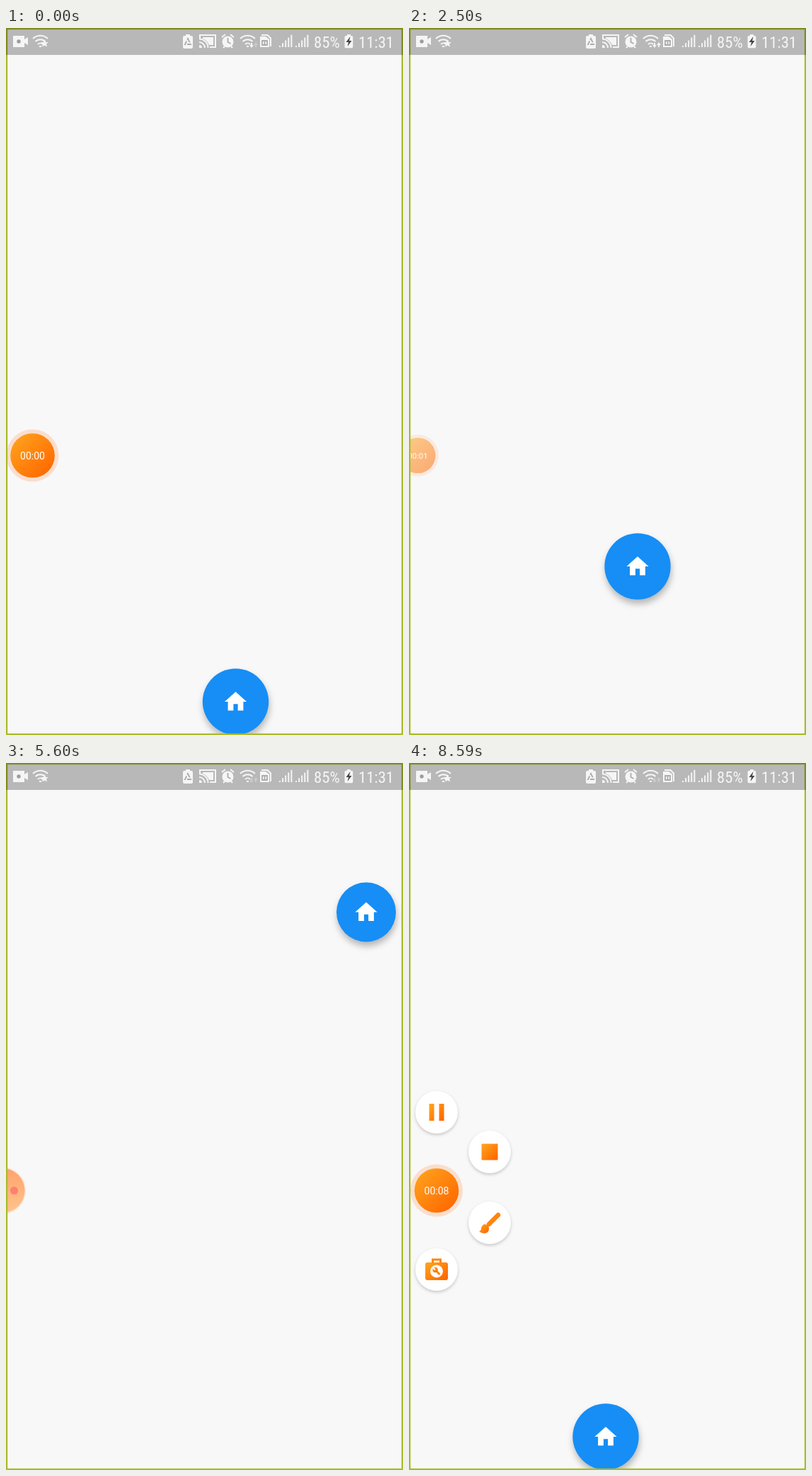
These frames come from a looping animation (561x998 px, 9.1 s). An HTML page:

```html
<!DOCTYPE html>
<html lang="en">
<head>
<meta charset="utf-8">
<title>Floating button</title>
<style>
html, body { margin: 0; width: 100%; height: 100%; overflow: hidden; background: #f8f8f8; }
svg { display: block; width: 561px; height: 998px; }
text { font-family: "Roboto Condensed", Roboto, sans-serif; text-anchor: middle; fill: #fff; }
#time { font: 14px Roboto, sans-serif; }
#fab { filter: drop-shadow(1px 6px 5px rgba(0,0,0,.27)); }
.item { filter: drop-shadow(0 2px 2px rgba(0,0,0,.2)); }
.line { fill: none; stroke: #fff; stroke-width: 2; }
.dark { fill: none; stroke: #aaa; stroke-width: 1.8; }
</style>
</head>
<body>
<svg viewBox="0 0 561 998">
  <defs>
    <linearGradient id="orange" x2="1" y2="1">
      <stop offset=".1" stop-color="#ffa01c"/><stop offset=".9" stop-color="#ff6800"/>
    </linearGradient>
    <linearGradient id="pale" x2="0" y2="1">
      <stop stop-color="#ffa36d"/><stop offset="1" stop-color="#ffc48b"/>
    </linearGradient>
    <path id="wifi" class="line" d="M0 6a15 15 0 0 1 21 0M3.5 10a10 10 0 0 1 14 0M7 14a5 5 0 0 1 7 0M9 17h3"/>
    <path id="signal" class="line"/>
    <path id="cell" d="M0 4q0-2 2-2h2v-2h6v2h2q2 0 2 2v14q0 2-2 2h-10q-2 0-2-2z"/>
    <path id="arrow" d="M-1 0h2v3h2l-3 4-3-4h2z"/>
  </defs>
  <rect width="561" height="998" fill="#f8f8f8"/>

  <g id="fab">
    <circle id="disc" r="46.7" fill="#168ef5"/>
    <path fill="#fff" d="M0-14l15.600 14h-4.700v12.500h-7.800v-9.300h-6.200v9.300h-7.800v-12.500h-4.700z"/>
  </g>

  <g id="menu" fill="url(#orange)">
    <g class="item"><circle r="30" fill="#fff"/><path d="M-10.500-12h7v24h-7zM3.500-12h7v24h-7z"/></g>
    <g class="item"><circle r="30" fill="#fff"/><rect x="-11.500" y="-11.500" width="23" height="23" rx="1"/></g>
    <g class="item"><circle r="30" fill="#fff"/>
      <path d="M-1 2L12-11" stroke="#ff8510" stroke-width="6.500" stroke-linecap="round"/>
      <path d="M-8 2q7 0 7 6.500t-7 6.500q-4 0-7-3q3-1 3-4t4-6z"/>
    </g>
    <g class="item"><circle r="30" fill="#fff"/>
      <rect x="-16" y="-10" width="32" height="25" rx="3"/>
      <path d="M-5.500-9v-5h11v5" fill="none" stroke="#ff8510" stroke-width="3"/>
      <circle cy="2.500" r="9" fill="#fff"/>
      <path d="M-1 1.500l5.500 5.500" stroke="#ff8510" stroke-width="3"/>
      <circle cx="-2" cy=".5" r="3.700"/>
      <path d="M-2 .5l-4-4" stroke="#fff" stroke-width="2"/>
    </g>
  </g>

  <g id="timer">
    <circle r="37" fill="#ff8640" opacity=".23"/>
    <circle r="31.300" fill="url(#orange)"/>
    <text id="time" y="5">00:00</text>
  </g>
  <g id="dock">
    <circle cx="-5" cy="603.500" r="33" fill="#ffb27a" opacity=".28"/>
    <circle cx="-5" cy="603.500" r="31.500" fill="url(#pale)"/>
    <circle cx="11.500" cy="603.500" r="5.600" fill="#ff8070"/>
  </g>

  <rect x="1" y="1" width="559" height="996" fill="none" stroke="#abbb2c" stroke-width="2.400"/>
  <rect width="561" height="38" opacity=".26"/>

  <g fill="#fff" opacity=".86">
    <path d="M10 11h16v5l5-3v11l-5-3v6h-16z"/>
    <circle cx="18" cy="19" r="2.700" fill="#999"/>
    <use href="#wifi" x="38" y="9"/>
    <path d="M54.500 16l1.500 4h4l-3 2.500 1 4-3.500-2-3.500 2 1-4-3-2.500h4z"/>
    <use href="#cell" x="250" y="9"/>
    <path class="dark" d="M257 15l4 8h-8z" stroke-dasharray="6 2"/>
    <path class="line" d="M274 15v-5h22v17h-8M273 20a8 8 0 0 1 8 8M273 15.500a12.500 12.500 0 0 1 12.500 12.500"/>
    <path d="M278 13h15v11h-6q-3-7-9-9zM273 24a4 4 0 0 1 4 4h-4z"/>
    <circle cx="313.500" cy="19.500" r="8"/>
    <path class="line" d="M305 13l5-4M322 13l-5-4M307 28l2-2M320 28l-2-2"/>
    <path class="dark" d="M313.500 14v6l4 2"/>
    <use href="#wifi" x="331" y="9"/>
    <use href="#arrow" id="down" x="347" y="21"/>
    <use href="#arrow" id="up" transform="translate(353 27) scale(1 -1)"/>
    <path d="M361 9h9l5 5v12h-2v-11l-4-4h-8z"/>
    <path d="M359 12h8l5 4v11h-13z"/>
    <path class="dark" d="M362 18h7v6h-7zM365.500 18v6"/>
    <use href="#signal" x="387" y="27"/>
    <use href="#signal" x="410" y="27"/>
    <text x="453.500" y="27.700" font-size="22.700">85%</text>
    <use href="#cell" transform="translate(478.500 9) scale(.84 .96)"/>
    <path d="M486.500 12l-6 8h3.500l-1.500 6 6-8h-3.500z" fill="#333"/>
    <text x="523" y="27.700" font-size="22.700">11:31</text>
  </g>
</svg>
<script>
const LOOP = 9100, LAST = 8590, TIMER_Y = 603.5;
const el = id => document.getElementById(id);
const items = [...document.querySelectorAll('.item')];

// Turning points of the dragged button
const stops = [
  { t: 20, x: 324.5, y: 951 },
  { t: 900, x: 272, y: 47 },
  { t: 1500, x: 200, y: 1070 },
  { t: 2500, x: 323, y: 760 },
  { t: 2800, x: 513, y: 485 },
  { t: 3300, x: 290, y: 880 },
  { t: 4310, x: 46, y: 450 },
  { t: 4700, x: 462, y: 58 },
  { t: 5150, x: 485, y: 930 },
  { t: 5600, x: 509, y: 210.5 },
  { t: 6400, x: 334, y: 945 },
  { t: 6920, x: 468, y: 809 },
  { t: 7700, x: 278, y: 951 }
];

const ramp = (t, a, b) => Math.min(1, Math.max(0, (t - a) / (b - a)));
const ease = (t, a, b) => { const u = ramp(t, a, b); return u * u * (3 - 2 * u); };
const mix = (a, b, u) => a + (b - a) * u;
const place = (node, x, y, s = 1) => node.setAttribute('transform', `translate(${x} ${y}) scale(${s})`);
const show = (node, on) => { node.style.display = on ? '' : 'none'; };

// Each stop pulls the button over from the one before it
const along = (t, axis) => stops.reduce((pos, stop, i) =>
  i ? mix(pos, stop[axis], ease(t, stops[i - 1].t, stop.t)) : stop[axis], 0);

el('signal').setAttribute('d',
  Array.from({ length: 5 }, (_, i) => `M${i * 4.1} 0v${-2 - i * 3.8}`).join(''));

function draw() {
  const t = Math.min(performance.now() % LOOP, LAST);
  place(el('fab'), along(t, 'x'), along(t, 'y'));
  const pressed = ease(t, 5200, 5350) - ease(t, 7200, 7350);
  el('disc').setAttribute('r', mix(46.7, 42, pressed));

  const shrink = ease(t, 1200, 1570), wake = ease(t, 7900, 8080), small = shrink - wake;
  const docked = t >= 5050 && t < 7900;
  place(el('timer'), mix(mix(37.5, 12.5, shrink), 39, wake), TIMER_Y, mix(1, .8, small));
  el('timer').setAttribute('opacity', mix(1, .52, small));
  show(el('timer'), !docked);
  show(el('dock'), docked);
  el('time').textContent = '00:0' + Math.max(0, Math.floor((t - 770) / 880));

  // Two outer items fan out straight up and down, two inner ones to the right
  const open = ramp(t, 8400, 8580);
  show(el('menu'), open);
  items.forEach((node, i) => {
    const inner = i === 1 || i === 2, side = i < 2 ? -1 : 1;
    const dy = side * (inner ? 50 : 111) + (inner ? -4.5 : .5);
    place(node, 39 + (inner ? 75 * open : 0), TIMER_Y + dy * open, mix(.4, 1, open));
  });

  const active = t < 5000;
  el('down').setAttribute('opacity', active ? 1 : .3);
  el('up').setAttribute('opacity', active && t > 500 ? 1 : .3);
  requestAnimationFrame(draw);
}
draw();
</script>
</body>
</html>
```
